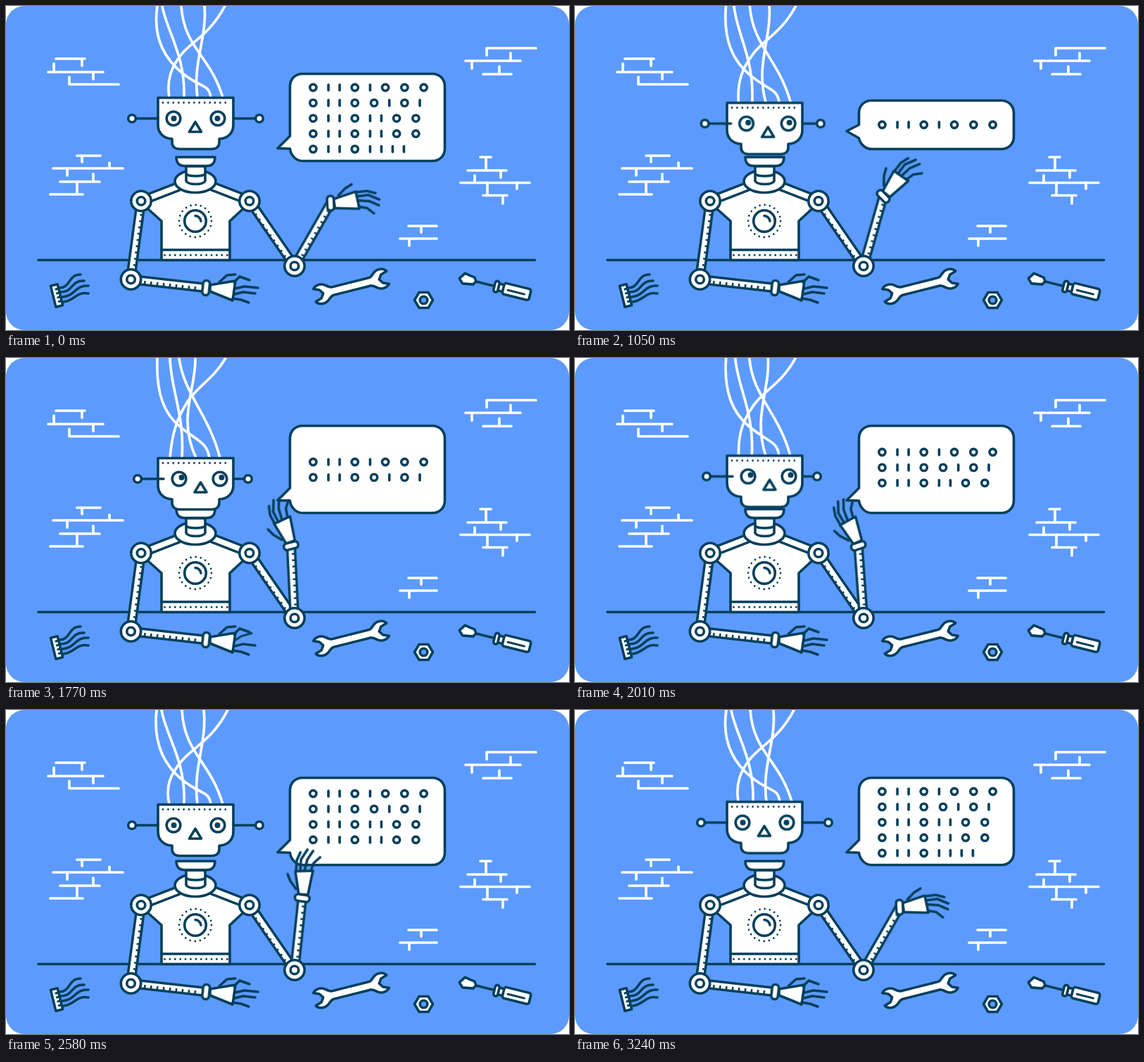
Recreate the animation shown at these times as an HTML page. Size 800 px wide and 461 px high, loop 3270 ms.

```html
<!DOCTYPE html>
<html lang="en">
<head>
<meta charset="utf-8">
<title>Talking robot</title>
<style>
html, body { margin: 0; width: 100%; height: 100%; overflow: hidden; background: #fff; }
svg { display: block; width: 800px; height: 461px; --ink: #043f5b; --sky: #5c9bfd; }
.s { fill: #fff; stroke: var(--ink); stroke-width: 3.6; stroke-linecap: round; stroke-linejoin: round; }
.n { fill: none; }
.dark { fill: var(--ink); stroke: none; }
.w { fill: none; stroke: #fff; stroke-width: 3.7; stroke-linecap: round; stroke-linejoin: round; }
.dots { fill: none; stroke: var(--ink); stroke-width: 2.8; stroke-linecap: round; stroke-dasharray: 0 7.4; }
.outer { fill: none; stroke: var(--ink); stroke-width: 14.4; }
.inner { fill: none; stroke: #fff; stroke-width: 7.4; }
.ticks { fill: none; stroke: var(--ink); stroke-width: 4; stroke-dasharray: 2.6 6.4; }

.head, .wires, .bubble, .fore, .hand, .fingers, .turn, .lines, .row, .tap {
  animation: 3270ms linear infinite;
}
.head { animation-name: nod; }
@keyframes nod {
  0%, 100% { transform: translateY(0); }
  17.43% { transform: translateY(4px); }
  23.85% { transform: translateY(4px); animation-timing-function: ease-out; }
  54.13% { transform: translateY(12px); animation-timing-function: ease-out; }
  78.9% { transform: translateY(4px); }
}
.wires { animation-name: sway; }
@keyframes sway {
  0%, 100% { d: path("M215 0C209 40 222 72 250 95S288 110 291 130M222 0C228 35 255 70 253 130M249 0C253 60 290 70 308 130M282 0C286 45 265 80 272 130M311 0C290 40 265 50 250 68S228 105 232 130"); }
  17.43% { d: path("M214 0C209 44 222 76 250 99S288 114 291 134M221 0C227 37 256 72 253 134M250 0C253 62 290 72 308 134M281 0C286 47 265 82 272 134M315 0C294 42 266 53 250 72S226 108 232 134"); }
  23.85% { d: path("M214 0C209 44 222 76 250 99S288 114 291 134M221 0C227 37 256 72 253 134M250 0C253 62 290 72 308 134M281 0C286 47 265 82 272 134M315 0C294 42 266 53 250 72S226 108 232 134"); animation-timing-function: ease-out; }
  54.13% { d: path("M215 0C213 50 224 80 250 100S286 122 289 142M233 0C234 45 254 80 250 142M246 0C252 50 289 82 304 142M269 0C270 45 243 85 270 142M312 0C295 30 272 40 258 62S236 105 233 142"); animation-timing-function: ease-out; }
  78.9% { d: path("M214 0C209 44 222 76 250 99S288 114 291 134M221 0C227 37 256 72 253 134M250 0C253 62 290 72 308 134M281 0C286 47 265 82 272 134M315 0C294 42 266 53 250 72S226 108 232 134"); }
}
.turn { animation-name: turn; }
@keyframes turn {
  0%, 28%, 76%, 100% { transform: translate(0, 0); }
  34%, 70.5% { transform: translate(var(--x), var(--y, 0px)); }
}
.fore { animation-name: fore; transform-origin: 410px 370px; }
@keyframes fore {
  0%, 91%, 100% { transform: rotate(29.8deg); }
  23.85% { transform: rotate(29.8deg); animation-timing-function: ease-in-out; }
  41.28% { transform: rotate(-.8deg); }
  54.13% { transform: rotate(-2.8deg); }
  69.72% { transform: rotate(-5.6deg); animation-timing-function: ease-in; }
  78.9% { transform: rotate(6deg); animation-timing-function: ease-out; }
}
.hand { animation-name: hand; transform-origin: 410px 267px; }
@keyframes hand {
  0%, 91%, 100% { transform: rotate(50deg); }
  23.85% { transform: rotate(50deg); animation-timing-function: ease-in-out; }
  41.28% { transform: rotate(-12deg); }
  54.13% { transform: rotate(-20deg); }
  69.72% { transform: rotate(-25deg); animation-timing-function: ease-in; }
  78.9% { transform: rotate(-6deg); animation-timing-function: ease-out; }
}
.fingers { animation-name: bend; transform-origin: 2px -36px; }
@keyframes bend {
  0%, 26%, 78%, 100% { transform: none; }
  40%, 70% { transform: rotate(-8deg); }
}
.tap { animation-name: tap; transform-origin: 325px 404px; }
@keyframes tap {
  0%, 36%, 60%, 100% { transform: rotate(0deg) scale(1); }
  40%, 56% { transform: rotate(-22deg) scale(.82); }
}
.bubble { animation-name: grow; }
@keyframes grow {
  0%, 24.5%, 44.5%, 100% { d: path("M421 96.5H606C616 96.5 623.5 104 623.5 114.5V203C623.5 213 616 220.5 606 220.5H421C412 220.5 404.5 212 403.5 203L386 202.5L403.5 185V114.5C403.5 104 411 96.5 421 96.5Z"); }
  29%, 38% { d: path("M421 134.5H606C616 134.5 623.5 142 623.5 152.5V186C623.5 196 616 203.5 606 203.5H421C412 203.5 404.5 195 403.5 188L386 178L403.5 169V152.5C403.5 142 411 134.5 421 134.5Z"); }
}
.lines { animation-name: scroll; }
@keyframes scroll {
  0%, 24.5%, 84%, 100% { transform: translateY(0); }
  24.6%, 42% { transform: translateY(53px); }
  46%, 56.5% { transform: translateY(32px); }
  59%, 65.5% { transform: translateY(18px); }
  68%, 82% { transform: translateY(3px); }
}
.row { animation-timing-function: step-end; }
@keyframes row0 { 0% { opacity: 1 } 24.5% { opacity: 0 } 31% { opacity: 1 } }
@keyframes row1 { 0% { opacity: 1 } 24.5% { opacity: 0 } 46.5% { opacity: 1 } }
@keyframes row2 { 0% { opacity: 1 } 24.5% { opacity: 0 } 59% { opacity: 1 } }
@keyframes row3 { 0% { opacity: 1 } 24.5% { opacity: 0 } 68% { opacity: 1 } }
@keyframes row4 { 0% { opacity: 1 } 24.5% { opacity: 0 } 84% { opacity: 1 } }
</style>
</head>
<body>
<svg viewBox="0 0 800 461">
  <defs>
    <g id="joint"><circle class="s" r="14.2"/><circle class="s" r="5.8"/></g>
    <path id="limbs" d="M193 277L247 256M346 277L292 256M192 277L177 389L284 401M346 277L410 370"/>
    <path id="jaws" d="M0 -5.8H27C34 -6 34 -14 44 -14C49 -14 52 -12 54 -9L45 -6L41 0L45 6L53 9.5C51 12 48 13.5 43 13.5C34 13.5 34 6 27 5.8H0"/>
  </defs>

  <rect width="800" height="461" rx="26" fill="var(--sky)"/>

  <!-- bricks -->
  <path class="w" d="M71 75H112M108 75V85M68 82V94M60 94H138M124 94V104M90 101V111.500H160
    M101 213H134M108 213V222M147 223V231M67 231H166M87 231V241M124 239V249M77 250H133M101 250V267M63 268H109
    M753 60H683V70M717 67V77M653 78H731M662 78V89M701 86V97M678 97H718
    M674 215H689M682 215V233M656 234H711M666 241V250M703 234V244M646 251.500H744M684 251V268M726 251V260M678 269.500H712M706 270V281
    M572 313H612M590 313V322M560 331H612M573 331V341"/>

  <path class="s n" d="M46 361.500H751.500"/>

  <!-- loose wires -->
  <g class="s n">
    <path d="M76 401C92 401 88 382 106 382M78 407C96 407 92 390 111 391M80 414C98 413 98 397 117 398M82 421C98 419 100 406 117 409"/>
    <g transform="translate(72 412) rotate(-14)">
      <rect x="-5" y="-15.500" width="10" height="31" fill="#fff"/>
      <path d="M1 -9H4M1 -3H4M1 3H4M1 9H4" stroke-width="3"/>
    </g>
  </g>

  <!-- wrench -->
  <g class="s" transform="translate(490.500 399) rotate(-14)">
    <use href="#jaws"/><use href="#jaws" transform="rotate(180)"/>
  </g>

  <!-- nut -->
  <path class="s" d="M580.500 418.500L587 407.500H600L606.500 418.500L600 429.500H587Z"/>
  <circle class="s" cx="593.500" cy="418.500" r="5.300" style="fill:var(--sky)"/>

  <!-- screwdriver -->
  <g class="s" transform="translate(696 399) rotate(14)">
    <path d="M-53 1.500L-47 -7.500L-32 -5L-29 0L-32 5L-47 7.500Z"/>
    <path d="M-29 0H-2"/>
    <path d="M4 -5H12V5H4Z"/>
    <rect x="-2" y="-8" width="6" height="16" rx="3"/>
    <rect x="11" y="-8" width="39" height="16" rx="3"/>
    <path d="M18 1H42" stroke-width="3"/>
  </g>

  <!-- bubble -->
  <path class="s bubble"/>
  <g class="s n lines" id="lines"></g>

  <!-- torso -->
  <path class="s" d="M192 280L243 258H296L346 280L318 306V361.500H221V306Z"/>
  <path class="s n" d="M221 347H318"/>
  <path class="dots" d="M225.500 354.500H316"/>
  <circle class="dots" cx="269" cy="306" r="23" style="stroke-dasharray:0 7.226"/>
  <circle class="s" cx="269" cy="306" r="15.300"/>
  <path class="s n" d="M269 298.500C273 298.500 276.500 302 277 306"/>

  <!-- arms -->
  <use href="#limbs" class="outer"/><use href="#limbs" class="inner"/>
  <path class="ticks" d="M192.500 296L182.500 372M196 393L276 402M354 296L400 362"/>

  <!-- neck -->
  <ellipse class="s" cx="269" cy="249.500" rx="29" ry="16"/>
  <path class="s" d="M256 228V249C259 255 280 255 283 249V228Z"/>
  <path class="s n" d="M256 239C260 243 279 243 283 239"/>
  <path class="s" d="M242 215H297C297 223 293 227.500 286 227.500H253C246 227.500 242 223 242 215Z"/>

  <!-- resting hand -->
  <path class="s" d="M290 397L326 391L322 419L290 406Z"/>
  <path class="s n" d="M303 393L314 383L326 382M324 393L332 385L346 390M325 410L337 407L354 409M322 416L334 418L345 422"/>
  <path class="s n tap" d="M326 402L339 399L358 401"/>
  <rect class="s" x="279.500" y="390.500" width="9.500" height="21" rx="4.700" transform="rotate(6 284 401)"/>

  <use href="#joint" x="192" y="277.500"/>
  <use href="#joint" x="177.500" y="389"/>
  <use href="#joint" x="346" y="277.500"/>

  <!-- head -->
  <path class="w wires"/>
  <g class="head">
    <g class="s turn" style="--x:-16px">
      <path d="M310 160H354"/><circle cx="360" cy="160" r="5.300"/>
    </g>
    <path class="s" d="M216 130.500H323V169C323 181 315 188.500 303 189V194C303 200 299 203.500 292 203.500H247C240 203.500 236 200 236 194V189C224 188.500 216 181 216 169Z"/>
    <path class="dots" d="M223 137.500H318"/>
    <g class="s turn" style="--x:8px">
      <path d="M185 160H216"/><circle cx="179" cy="160" r="5.300"/>
      <circle cx="238" cy="160" r="9.800"/>
    </g>
    <circle class="s turn" style="--x:3px" cx="301" cy="160" r="9.800"/>
    <circle class="dark turn" style="--x:11px;--y:-2px" cx="238.500" cy="160" r="4"/>
    <circle class="dark turn" style="--x:6px;--y:-2px" cx="300.500" cy="160" r="4"/>
    <path class="s turn" style="--x:7.500px" d="M269 165L260.500 179H277.500Z"/>
  </g>

  <!-- waving arm -->
  <g class="fore">
    <path class="outer" d="M410 370V267"/><path class="inner" d="M410 370V267"/>
    <path class="ticks" d="M412.500 352V276"/>
    <g class="hand">
      <g transform="translate(410 267)">
        <path class="s" d="M-5 -5L-10 -38L15 -39L8 -5Z"/>
        <path class="s n" d="M-9 -13L-17 -24L-21 -34"/>
        <path class="s n fingers" d="M-9 -39L-8 -54L-3 -65M-3 -39L-2 -55L7 -69M3 -39L7 -55L15 -67M12 -39L16 -50L25 -58"/>
        <rect class="s" x="-10.500" y="-4.800" width="21" height="9.600" rx="4.700" transform="rotate(8)"/>
      </g>
    </g>
  </g>
  <use href="#joint" x="410" y="370"/>
</svg>
<script>
// Each row spells one letter in binary; zeros are wider than ones.
const lines = document.getElementById('lines');
const add = (parent, tag, attrs) => {
  const el = document.createElementNS('http://www.w3.org/2000/svg', tag);
  for (const key in attrs) el.setAttribute(key, attrs[key]);
  return parent.appendChild(el);
};
[...'hello'].forEach((letter, i) => {
  const row = add(lines, 'g', { class: 'row', style: `animation-name:row${i}` });
  const y = 116 + i * 21.9;
  let x = 422.8;
  for (const bit of letter.charCodeAt(0).toString(2).padStart(8, '0')) {
    const half = bit === '0' ? 13.65 : 8;
    x += half;
    if (bit === '0') add(row, 'circle', { cx: x, cy: y, r: 4.6 });
    else add(row, 'path', { d: `M${x} ${y - 4}v8` });
    x += half;
  }
});
</script>
</body>
</html>
```
